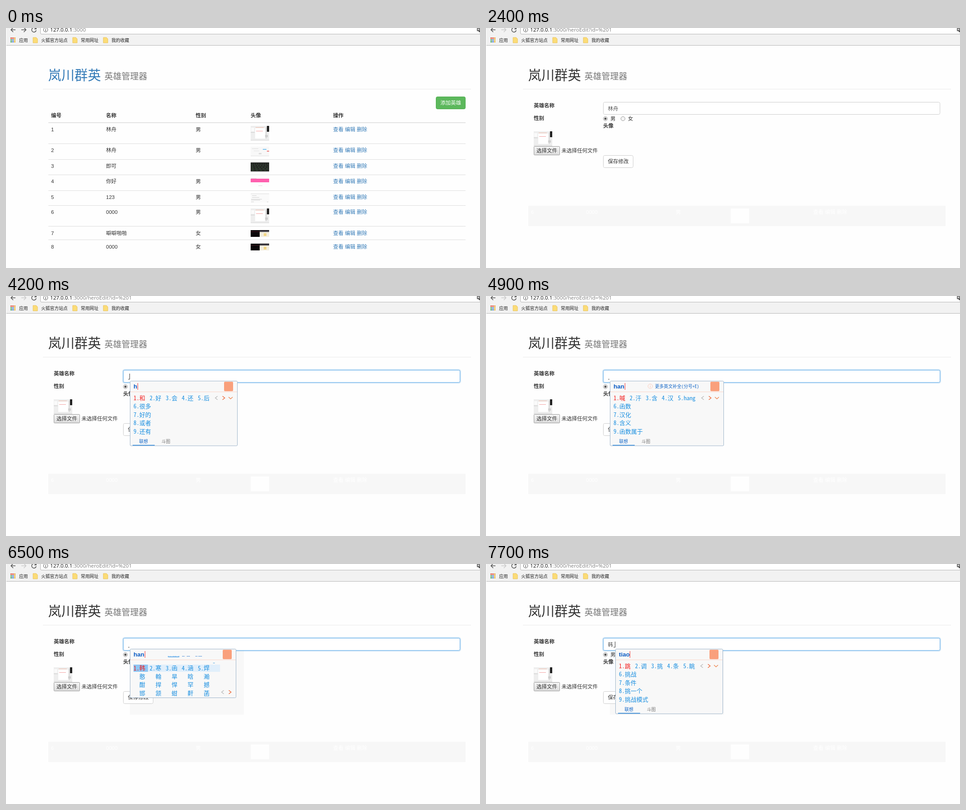
Recreate the animation shown at these times as an HTML page. Size 1052 px wide and 532 px high, loop 8 s.

```html
<!DOCTYPE html>
<html lang="zh-CN">
<head>
<meta charset="utf-8">
<title>英雄管理器</title>
<style>
html, body { margin: 0; width: 100%; height: 100%; overflow: hidden; background: #fefefe; }
svg { display: block; width: 1052px; height: 532px; }
text { font: 11.5px "Liberation Sans", "Noto Sans CJK SC", sans-serif; fill: #333; }
.b { font-weight: 700; }
.link { fill: #337ab7; }
.white { fill: #fff; }
.field { fill: #555; }
.h1 { font-size: 29.3px; }
.sub { font-size: 19px; fill: #777; }
.mark { font-size: 9.8px; fill: #222; }
.url { font: 11.65px "Noto Sans", "Noto Sans CJK SC", sans-serif; fill: #888; }
.ime { font: 13px "Noto Sans Mono CJK SC", "Noto Sans CJK SC", monospace; fill: #1a8fe0; }
.tip { font-size: 9.8px; fill: #1468c8; }
.gray { fill: #777; }
.red { fill: #f21d1d; }
.pale { fill: #fff; }
.typed { font-size: 13.5px; font-weight: 700; fill: #0b5cc4; }
.line { fill: none; stroke-width: 1.5; }

/* one loop is 8 s, so 1% is 80 ms */
.t { animation: 8s step-end infinite; }
.list { animation-name: list; }
.edit { animation-name: edit; }
.focus { animation-name: focus; }
.name2 { animation-name: name2; }
.name1 { animation-name: name1; }
.han { animation-name: han; }
.caret { animation-name: caret; }
.under { animation-name: under; }
.p1 { animation-name: p1; }
.p2 { animation-name: p2; }
.p3 { animation-name: p3; }
.p4 { animation-name: p4; }
.p5 { animation-name: p5; }
.p6 { animation-name: p6; }
.grid { animation-name: grid; }
.grow { animation-name: grow; }
.roll { animation-name: roll; }
.pager { animation-name: pager; }
.tabs { animation-name: tabs; }
.after1 { animation-name: after1; }
.after2 { animation-name: after2; }
.hint { animation: hint 8s linear infinite; }

@keyframes list { 0% { opacity: 1 } 28.75%, 100% { opacity: 0 } }
@keyframes edit { 0% { opacity: 0 } 28.75%, 100% { opacity: 1 } }
@keyframes focus { 0% { opacity: 0 } 38.75% { opacity: .5 } 40%, 100% { opacity: 1 } }
@keyframes name2 { 0% { opacity: 1 } 47.5%, 100% { opacity: 0 } }
@keyframes name1 { 0% { opacity: 0 } 47.5% { opacity: 1 } 48.75%, 100% { opacity: 0 } }
@keyframes han { 0% { opacity: 0 } 87.5%, 100% { opacity: 1 } }
@keyframes caret {
  0% { opacity: 0; transform: translateX(293px) }
  38.75% { opacity: 1; transform: translateX(293px) }
  45% { opacity: 0; transform: translateX(293px) }
  47.5% { opacity: 1; transform: translateX(282px) }
  48.75% { opacity: 1; transform: translateX(271px) }
  52.5% { opacity: 1; transform: translateX(274px) }
  61.25% { opacity: 0; transform: translateX(274px) }
  66.25% { opacity: 1; transform: translateX(274px) }
  72.5% { opacity: 0; transform: translateX(274px) }
  76.25% { opacity: 1; transform: translateX(274px) }
  81.25% { opacity: 0; transform: translateX(274px) }
  87.5% { opacity: 1; transform: translateX(282px) }
  92.5%, 100% { opacity: 1; transform: translateX(286px) }
}
@keyframes under {
  0% { opacity: 0; transform: none }
  52.5% { opacity: 1; transform: none }
  87.5% { opacity: 0; transform: none }
  92.5%, 100% { opacity: 1; transform: translateX(12px) }
}
@keyframes p1 { 0% { opacity: 0 } 52.5% { opacity: 1 } 53.75%, 100% { opacity: 0 } }
@keyframes p2 { 0% { opacity: 0 } 53.75% { opacity: 1 } 55%, 100% { opacity: 0 } }
@keyframes p3 { 0% { opacity: 0 } 55% { opacity: 1 } 76.25%, 100% { opacity: 0 } }
@keyframes grid { 0% { opacity: 0 } 76.25% { opacity: 1 } 87.5%, 100% { opacity: 0 } }
@keyframes p4 { 0% { opacity: 0 } 92.5% { opacity: 1 } 95%, 100% { opacity: 0 } }
@keyframes p5 { 0% { opacity: 0 } 95% { opacity: 1 } 96.25%, 100% { opacity: 0 } }
@keyframes p6 { 0% { opacity: 0 } 96.25%, 100% { opacity: 1 } }
@keyframes grow { 0% { height: 76px } 77.5% { height: 98px } 78.75%, 100% { height: 108px } }
@keyframes roll { 0% { transform: none } 77.5% { transform: translateY(-9px) } 78.75%, 100% { transform: translateY(-14px) } }
@keyframes pager { 0% { transform: none } 77.5% { transform: translateY(22px) } 78.75%, 100% { transform: translateY(32px) } }
@keyframes tabs { 0% { transform: none } 77.5% { transform: translateY(-3px) } 78.75%, 100% { transform: translateY(-4px) } }
@keyframes after1 { 0% { opacity: 0 } 76.25%, 100% { opacity: 1 } }
@keyframes after2 { 0% { opacity: 0 } 87.5%, 100% { opacity: 1 } }
@keyframes hint { 0%, 61.5% { opacity: 1 } 66.25%, 100% { opacity: 0 } }
</style>
</head>
<body>
<svg id="stage" viewBox="0 0 1052 532"></svg>
<script>
(() => {
const text = (x, y, s, cls = '') => `<text x="${x}" y="${y}" class="${cls}">${s}</text>`;
const rect = (x, y, w, h, fill, more = '') =>
  `<rect x="${x}" y="${y}" width="${w}" height="${h}" fill="${fill}" ${more}/>`;
const box = (x, y, w, h, fill, stroke, r = 3) =>
  rect(x + .5, y + .5, w - 1, h - 1, fill, `stroke="${stroke}" rx="${r}"`);
const line = (d, color, more = '') => `<path d="${d}" class="line" stroke="${color}" ${more}/>`;
const timed = (cls, body) => `<g class="t ${cls}">${body}</g>`;
const clipped = (id, body) => `<g clip-path="url(#${id})">${body}</g>`;
const range = n => [...Array(n).keys()];

// thumbnails, each drawn from its top left corner
const thumbs = {
  window: rect(0, 0, 41, 33, '#eee') + rect(10, 5, 22, 23, '#fff') + rect(1, 4, 7, 8, '#fafafa') +
    rect(36, 0, 5, 13, '#222') + rect(33, 3, 3, 25, '#ddd') + rect(11, 3, 18, 1, '#f0b9a8') +
    rect(12, 11, 15, 1, '#f3a2a2') + rect(0, 14, 9, 1, '#ccc') + rect(0, 31, 41, 1, '#dcdcdc') +
    rect(32, 20, 6, 5, '#cfcfcf'),
  form: rect(0, 0, 41, 22, '#f8f8f8') + rect(3, 4, 14, 1, '#ddd') + rect(7, 9, 12, 1, '#e2e2e2') +
    rect(18, 14, 6, 3, '#ddd') + rect(27, 5, 8, 2, '#7ec4ef') + rect(36, 9, 5, 2, '#ee7a7a') + rect(0, 20, 41, 1, '#e5e5e5'),
  term: rect(0, 0, 41, 20, '#262626') +
    range(5).map(i => line(`M2 ${3.5 + i * 3.5}h37`, '#3f6a3f', `stroke-dasharray="${2 + i} 3" opacity=".6"`)).join(''),
  pink: rect(0, 0, 41, 21, '#fdfdfd') + rect(1, 1, 12, 1, '#ddd') + rect(0, 2, 41, 8, '#ff5fae') + rect(17, 17, 9, 1, '#ddd'),
  page: rect(0, 0, 41, 20, '#fafafa') + rect(0, 0, 41, 1, '#ddd') +
    [[3, 4, 10], [3, 8, 16], [1, 12, 24], [1, 14, 20], [1, 18, 6], [36, 18, 3]].map(([x, y, w]) => rect(x, y, w, 1, '#d2d2d2')).join(''),
  dark: rect(0, 0, 41, 15, '#0b0709') + rect(20, 4, 21, 11, '#f4eede') + rect(0, 3, 20, 1, '#4a1a22') +
    rect(29, 7, 6, 6, '#f2d685') + rect(20, 2, 21, 1, '#99a')
};
const thumb = (x, y, kind) => `<g transform="translate(${x} ${y})">${thumbs[kind]}</g>`;

const actions = '查看 编辑 删除';
// top, text middle, name, gender, thumbnail, thumbnail top
const heroes = [
  [209, 225, '林舟', '男', 'window', 217],
  [256, 271, '林舟', '男', 'form', 263],
  [291, 306, '即可', '', 'term', 298],
  [325, 340, '你好', '男', 'pink', 332],
  [360, 375, '123', '男', 'page', 367],
  [393, 408, '0000', '男', 'window', 400],
  [439, 455, '噼噼啪啪', '女', 'dark', 448],
  [469, 485, '0000', '女', 'dark', 478]
];
const cells = (values, y, cls = '', last = cls) =>
  [100, 222, 421, 543, 726].map((x, i) => text(x, y, values[i], i > 3 ? last : cls)).join('');

const title = cls => text(93.5, 114.5, '岚川群英', 'h1 ' + cls);
const address = path => text(98, 7.5, `<tspan fill="#222">127.0.0.1</tspan>:3000${path}`, 'url');
const forward = color => line('M34 4h10M39.5 -1l5 5l-5 5', color);
const folder = x => `<path d="M${x} 21h7l3 3v9h-10z" fill="#fbdc78" stroke="#e6bd4d" stroke-width=".8"/>`;
const dots = ['#e0523f', '#e0523f', '#e8a33b', '#4aa564', '#4f82d8', '#e8b53b', '#4aa564', '#4f82d8', '#e8b53b'];

const toolbar = rect(1, 0, 1051, 38, '#f2f2f2') + rect(1, 38, 1051, 1, '#b5b5b5') +
  `<path d="M76.5 -2V11q0 2.5 2.5 2.5H1052V-2z" fill="#fff" stroke="#b4b4b4"/>` +
  line('M21 4H11M16 -1l-5 5l5 5', '#555') +
  line('M66 1A5 5 0 1 0 67 5M67 -2v4h-4', '#555') +
  `<circle cx="88" cy="4" r="4.8" fill="none" stroke="#555"/>` + rect(87.4, 3, 1.3, 4, '#555') +
  rect(87.4, .8, 1.3, 1.3, '#555') +
  rect(1045, 0, 7, 7, '#777', 'rx="1"') + rect(1047, 2, 3, 2, '#eee') + rect(1049, 6, 3, 3, '#555') +
  dots.map((color, i) => rect(10 + i % 3 * 4, 21 + Math.floor(i / 3) * 4, 3, 3, color)).join('') +
  text(29, 31, '应用', 'mark') +
  folder(60) + text(78, 31, '火狐官方站点', 'mark') +
  folder(148) + text(166, 31, '常用网址', 'mark') +
  folder(216) + text(234, 31, '我的收藏', 'mark');

const heading = text(218.5, 114, '英雄管理器', 'sub') + rect(82, 135, 950, 1, '#eaeaea');

const list = address('') + forward('#555') + title('link') +
  box(954, 152, 66, 28, '#5cb85c', '#4cae4c') + text(964, 170, '添加英雄', 'white') +
  cells(['编号', '名称', '性别', '头像', '操作'], 198.3, 'b') +
  heroes.map(([top, mid, name, sex, kind, y], i) =>
    rect(94, top, 926, i ? 1 : 1.6, '#ddd') +
    cells([i + 1, name, sex, '', actions], mid + 4, '', 'link') + thumb(543, y, kind)).join('');

const radio = (x, on) =>
  `<circle cx="${x}" cy="201" r="4.6" fill="#f4f4f4" stroke="#999"/>` +
  (on ? `<circle cx="${x}" cy="201" r="2.5" fill="#555"/>` : '');

const leftover = rect(94, 394, 926, 45, '#f7f7f7') + rect(543, 400, 41, 33, '#fefefe') +
  cells([6, '0000', '男', '', actions], 412, 'white') +
  timed('after1', rect(275, 188, 253, 146, '#f8f8f8')) +
  timed('after2', rect(275, 188, 237, 108, '#fafcff'));

const edit = address('/heroEdit?id=%201') + forward('#ccc') + title('') + leftover +
  text(106, 176.3, '英雄名称', 'b') + text(106, 204, '性别', 'b') + text(260, 221, '头像', 'b') +
  box(260, 164, 748, 28, '#fff', '#ccc') +
  timed('focus', rect(259.5, 163.5, 749, 29, 'none', 'rx="4" stroke="#66afe9" stroke-width="3" opacity=".3"') +
    box(260, 164, 748, 28, '#fff', '#66afe9')) +
  timed('name2', text(270.5, 182.7, '林舟', 'field')) +
  timed('name1', text(270.5, 182.7, '林', 'field')) +
  timed('han', text(270.5, 182.7, '韩', 'field')) +
  timed('under', rect(271, 184, 3, 1, '#555')) +
  timed('caret', rect(0, 172, 1, 13, '#333')) +
  radio(265, true) + text(276, 204.7, '男') + radio(304, false) + text(315, 204.7, '女') +
  thumb(106, 229, 'window') +
  box(106, 262, 58, 20, 'url(#btn)', '#999', 1) + text(112, 276, '选择文件') + text(167.5, 276, '未选择任何文件') +
  box(260, 282, 67, 28, '#fff', '#ccc') + text(270.5, 300, '保存修改');

// input method window
const panel = (x, w, h, cls = '') =>
  rect(x + .5, 188.5, w - 1, h, '#f8f8f8', `class="${cls}" stroke="#9db4ca" rx="2"`);
const typing = (x, w, typed, caret) =>
  rect(x + 1, 212, w - 2, 1, '#fbd5c8') + rect(x + w - 30, 190, 20, 21, '#f9a07c', 'rx="2"') +
  text(x + 8, 205, typed, 'typed') + rect(x + caret, 193, 1, 15, '#e33');
const arrow = (x, y, color, dir) => line(`M${x - dir * 2.5} ${y - 4}l${dir * 5} 4l${-dir * 5} 4`, color);

const popup = (cls, x, w, typed, caret, picks, words, extra = '') => {
  const right = x + w;
  return timed(cls, panel(x, w, 143.5) + typing(x, w, typed, caret) +
    picks.split(' ').map((s, i) => text(x + 8 + i * 35.7, 230.5, `${i + 1}.${s}`, i ? 'ime' : 'ime red')).join('') +
    words.split(' ').map((s, i) => text(x + 8, 249 + i * 18.6, `${i + 6}.${s}`, 'ime')).join('') +
    arrow(right - 47, 226, '#bbb', -1) + arrow(right - 31, 226, '#ee6a3c', 1) +
    line(`M${right - 20} 224l4.5 4l4.5 -4`, '#ee8a55') +
    text(x + 20.5, 326, '联想', 'ime tip') + rect(x + 6, 330, 49, 1.5, '#2b86d9') +
    text(x + 70, 326, '斗图', 'ime tip gray') + extra);
};

const hint = `<g class="hint"><circle cx="364.5" cy="200" r="5" fill="none" stroke="#fbc9b8"/>` +
  rect(364, 199, 1, 4, '#fbc9b8') + rect(364, 197, 1, 1, '#fbc9b8') +
  text(375, 203.7, '更多英文补全(分号+E)', 'ime tip') + '</g>';

const columns = ['喊 韩 憨 酣 邯', '汗 寒 翰 捍 颔', '含 函 旱 悍 蚶', '汉 涵 晗 罕 鼾', 'hang 焊 瀚 撼 菡'];
const columnX = i => 283 + i * 35.7;
const glyphs = columns.map((col, i) => col.split(' ').map((s, j) =>
  text(columnX(i) + 13, 230.5 + j * 18.6, s, i === 0 && j === 1 ? 'ime red' : 'ime')).join('')).join('');
const grid = timed('grid', panel(275, 236, 76, 't grow') + typing(275, 236, 'han', 33) +
  clipped('strip', timed('tabs', rect(359, 198, 26, 13, '#86bdec', 'rx="2"') +
    text(362, 208, '分词', 'ime tip pale') + text(390, 208, '部首', 'ime tip') + text(416, 208, '笔画', 'ime tip'))) +
  rect(283, 223, 192, 16, '#e1effb') + rect(283, 223, 32, 16, '#8fc6f4') +
  range(5).map(i => text(columnX(i), 235.5, i + 1 + '.', i ? 'ime' : 'ime red')).join('') +
  clipped('body', clipped('rows', timed('roll', glyphs))) +
  timed('pager', arrow(481, 252, '#bbb', -1) + arrow(497, 252, '#ee6a3c', 1)));

const clip = (id, shape) => `<clipPath id="${id}">${shape}</clipPath>`;
const defs = `<defs><linearGradient id="btn" x2="0" y2="1"><stop stop-color="#f6f6f6"/>
  <stop offset="1" stop-color="#dcdcdc"/></linearGradient>` +
  clip('strip', rect(350, 204, 120, 7, '#000')) +
  clip('rows', rect(276, 219, 234, 90, '#000')) +
  clip('body', rect(276, 188, 234, 76, '#000', 'class="t grow"')) + '</defs>';

document.getElementById('stage').innerHTML = defs + toolbar + heading +
  timed('list', list) +
  timed('edit', edit +
    popup('p1', 275, 239, 'h', 17, '和 好 会 还 后', '很多 好的 或者 还有') +
    popup('p2', 275, 239, 'ha', 24.5, '哈 还 海 害 嗨', '还是 哈哈 孩子 好啊') +
    popup('p3', 275, 253, 'han', 33, '喊 汗 含 汉 hang', '函数 汉化 含义 函数属于', hint) +
    grid +
    popup('p4', 287, 239, 't', 13, '他 她 天 同 听', '他们 条件 天天 她们') +
    popup('p5', 287, 246, 'tia', 24.5, '天 条 田 跳 tian', '天天 条件 天气 天天向上') +
    popup('p6', 287, 239, 'tiao', 32, '跳 调 挑 条 眺', '挑战 条件 挑一个 挑战模式'));
})();
</script>
</body>
</html>
```
